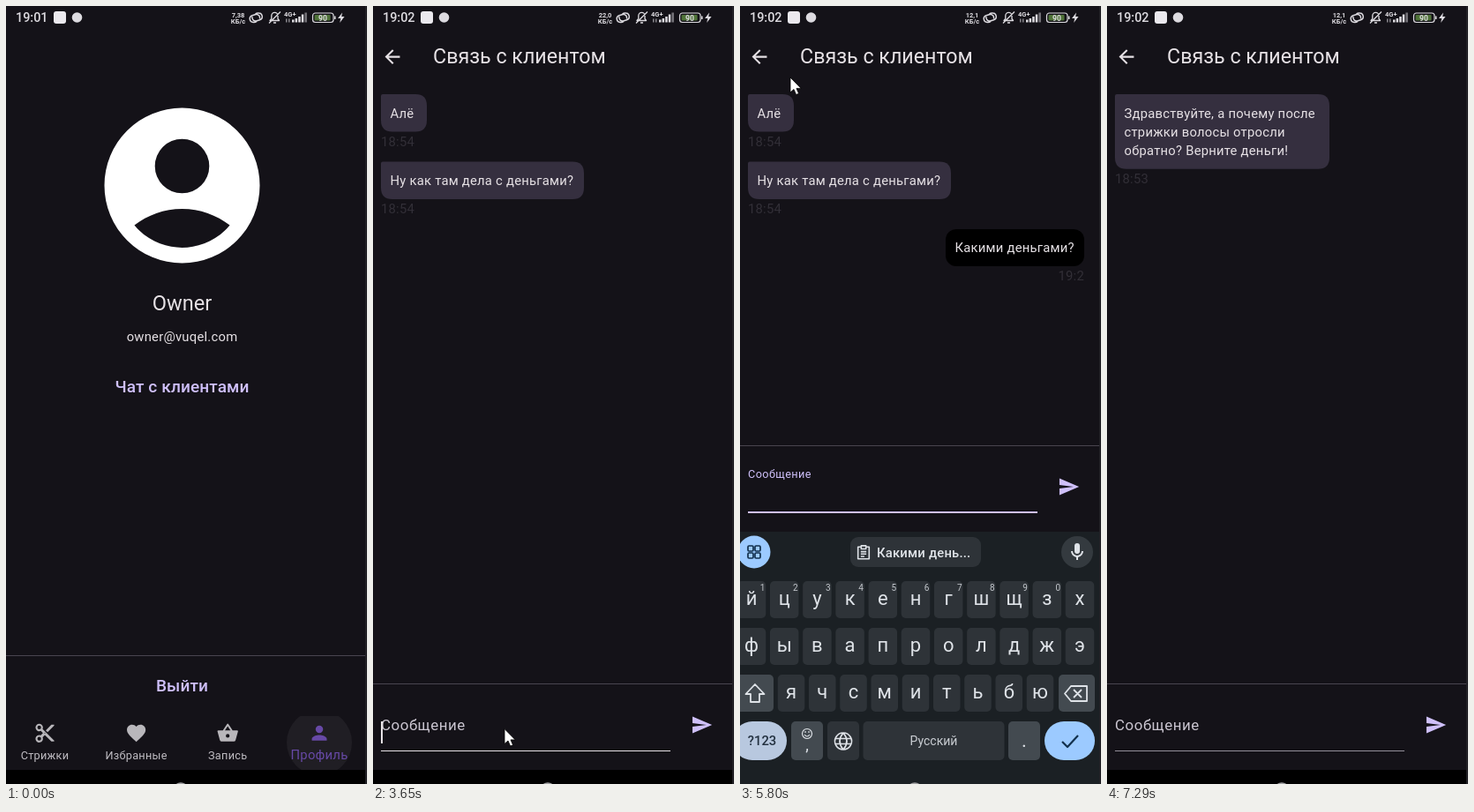
These frames come from a looping animation (409 by 882 pixels, 8000 ms). An HTML page:

```html
<!DOCTYPE html>
<html lang="ru">
<head>
<meta charset="utf-8">
<title>Чат с клиентами</title>
<style>
  html, body { margin: 0; width: 100%; height: 100%; overflow: hidden; background: #000; }
  svg { display: block; width: 100vw; height: 100vh; }
  text { font-family: Roboto, sans-serif; white-space: pre; }
</style>
</head>
<body>
<svg id="stage" viewBox="0 0 409 882" preserveAspectRatio="none"></svg>
<script>
const LOOP = 8000, DP = 1.057;
const BG = '#141218', TEXT = '#e6e1e5', PRIMARY = '#cfc0fa', LINE = '#49454f', OUTLINE = '#938f99', ACTIVE = '#6749a6',
      KEY = '#2e3338', KEY_ALT = '#434a50', BLUE = '#9ccaff', KEY_TEXT = '#dfe3e8';

const ICONS = {
  account: 'M12 2a10 10 0 1 0 0 20 10 10 0 1 0 0-20zm0 4a3.5 3.5 0 1 1 0 7 3.5 3.5 0 1 1 0-7zm0 14c-2.03 0-4.43-.82-6.14-2.88C7.55 15.8 9.68 15 12 15s4.45.8 6.14 2.12C16.43 19.19 14.03 20 12 20z',
  cut: 'M9.64 7.64A4 4 0 1 0 7.64 9.64L10 12l-2.36 2.36A4 4 0 1 0 9.64 16.36L12 14l7 7h3v-1zM6 8a2 2 0 1 1 0-4 2 2 0 1 1 0 4zm0 12a2 2 0 1 1 0-4 2 2 0 1 1 0 4zm6-7.5a.5.5 0 1 1 0-1 .5.5 0 1 1 0 1zM19 3l-6 6 2 2 7-7V3z',
  heart: 'M12 21.35l-1.45-1.32C5.4 15.36 2 12.28 2 8.5 2 5.42 4.42 3 7.5 3c1.74 0 3.41.81 4.5 2.09C13.09 3.81 14.76 3 16.5 3 19.58 3 22 5.42 22 8.5c0 3.78-3.4 6.86-8.55 11.54z',
  basket: 'M17.21 9l-4.38-6.56a1 1 0 0 0-1.66 0L6.79 9H2a1 1 0 0 0-.96 1.27l2.54 9.27A2 2 0 0 0 5.5 21h13a2 2 0 0 0 1.93-1.46l2.54-9.27A1 1 0 0 0 22 9zM9 9l3-4.4L15 9zm3 8a2 2 0 1 1 0-4 2 2 0 1 1 0 4z',
  person: 'M12 12a4 4 0 1 0 0-8 4 4 0 1 0 0 8zm0 2c-2.67 0-8 1.34-8 4v2h16v-2c0-2.66-5.33-4-8-4z',
  back: 'M20 11H7.83l5.59-5.59L12 4l-8 8 8 8 1.41-1.41L7.83 13H20z',
  send: 'M2 21L23 12 2 3v7l15 2-15 2z',
  palette: 'M12 2.5a9.5 9.5 0 1 0 0 19c1.6 0 2.2-1.5 1.3-2.6-1-1.2 0-2.4 1.2-2.4H17c2.6 0 4.5-2 4.5-4.6 0-5.3-4.3-9.4-9.5-9.4zM6.5 13a1.5 1.5 0 1 1 0-3 1.5 1.5 0 1 1 0 3zm3-4a1.5 1.5 0 1 1 0-3 1.5 1.5 0 1 1 0 3zm5 0a1.5 1.5 0 1 1 0-3 1.5 1.5 0 1 1 0 3zm3 4a1.5 1.5 0 1 1 0-3 1.5 1.5 0 1 1 0 3z',
  mic: 'M12 14a3 3 0 0 0 3-3V5a3 3 0 0 0-6 0v6a3 3 0 0 0 3 3zm5-3a5 5 0 0 1-10 0H5a7 7 0 0 0 6 6.9V21h2v-3.1A7 7 0 0 0 19 11z'
};

// Markup helpers
const text = (x, y, s, { size = 14 * DP, fill = TEXT, weight = 400, anchor = 'start', gap = .25, id = '' } = {}) =>
  `<text id="${id}" x="${x}" y="${y}" font-size="${size}" fill="${fill}" font-weight="${weight}" text-anchor="${anchor}" letter-spacing="${gap}">${s}</text>`;
const mid = (x, y, s, style) => text(x, y, s, { anchor: 'middle', ...style });
const rect = (x, y, w, h, fill, r = 0, extra = '') =>
  `<rect x="${x}" y="${y}" width="${w}" height="${h}" rx="${r}" fill="${fill}" ${extra}/>`;
const circle = (x, y, r, fill, extra = '') => `<circle cx="${x}" cy="${y}" r="${r}" fill="${fill}" ${extra}/>`;
const stroke = (d, color, width = 1.8) =>
  `<path d="${d}" fill="none" stroke="${color}" stroke-width="${width}" stroke-linejoin="round"/>`;
const icon = (name, x, y, fill, scale = DP) =>
  `<path d="${ICONS[name]}" fill="${fill}" fill-rule="evenodd" transform="translate(${x} ${y}) scale(${scale}) translate(-12 -12)"/>`;
const group = (id, body) => `<g id="${id}">${body}</g>`;
const page = (id, body) => group(id, rect(-8, 0, 415, 866, BG) + body);
const appBar = title => icon('back', 22, 57.6, TEXT) + text(68, 65, title, { size: 22 * DP, gap: 0 });

function profilePage() {
  const action = { size: 18 * DP, weight: 500, fill: PRIMARY, gap: .1 };
  const tabs = [['cut', 'Стрижки', 44], ['heart', 'Избранные', 147.6], ['basket', 'Запись', 251.2]];
  return page('profile',
    icon('account', 199.5, 203.5, '#fff', 8.8) +
    mid(199.5, 345, 'Owner', { size: 23.6, gap: 0 }) +
    mid(199.5, 380, 'owner@vuqel.com') +
    mid(199.5, 438, 'Чат с клиентами', action) +
    rect(-8, 736, 415, 1, LINE) +
    mid(199.5, 777, 'Выйти', action) +
    `<clipPath id="bar"><rect y="805" width="407" height="61"/></clipPath>` +
    circle(355, 835, 37, '#201e24', 'id="tabRipple" clip-path="url(#bar)"') +
    tabs.map(([name, label, x]) => icon(name, x, 824.3, '#b9b7bb') +
      mid(x, 854, label, { size: 12 * DP, fill: '#bfbcc2', gap: .3 })).join('') +
    icon('person', 355, 824.3, ACTIVE) + mid(355, 853.5, 'Профиль', { fill: ACTIVE }));
}

function listPage() {
  const card = (y, name, mail, message) => rect(-8, y, 415, 100, '#1d1b20') +
    icon('account', 25, y + 32.5, '#fff', 1.32) +
    text(51, y + 32, name, { weight: 500 }) +
    text(51, y + 53.5, mail, { weight: 500, fill: PRIMARY }) +
    text(51, y + 78, 'Сообщение: ' + message, { weight: 300 });
  return page('list', rect(-8, 92, 415, 212, '#111015') + rect(-8, 304, 415, 2, BG) + appBar('Список чатов') +
    card(92, 'Oleg', 'oleg@zuqil.com', 'Ну как там дела с ...') +
    card(201, 'Vitya', 'vitya@zuqil.com', 'Здравствуйте, а почему ...'));
}

function chatPage() {
  const bubble = (y, w, time, lines) => {
    const h = 42.5 + (lines.length - 1) * 21.1;
    return `<path d="M11 ${y}H${w - 4}q13 0 13 13V${y + h - 13}q0 13-13 13H22q-13 0-13-13V${y + 2}q0-2 2-2z" fill="#352f3f"/>` +
      lines.map((line, i) => text(19.5, y + 26.5 + i * 21.1, line)).join('') +
      text(9, y + h + 16, time, { fill: '#322f37' });
  };
  return page('chat', appBar('Связь с клиентом') +
    group('empty', mid(199.5, 428.5, 'Здесь пусто. Отправьте сообщение!')) +
    group('firstChat', bubble(100, 52, '18:54', ['Алё']) + bubble(176.5, 230, '18:54', ['Ну как там дела с деньгами?'])) +
    group('reply', rect(233, 253, 157, 42, '#000', 12) + text(243.5, 279, 'Какими деньгами?') +
      text(390, 311, '19:2', { anchor: 'end', fill: '#322f37' })) +
    group('secondChat', bubble(100, 243, '18:53',
      ['Здравствуйте, а почему после', 'стрижки волосы отросли', 'обратно? Верните деньги!'])) +
    group('input', rect(-8, 768, 415, 1, LINE) +
      rect(9, 844, 328, 1, OUTLINE, 0, 'id="underline"') +
      text(0, 0, 'Сообщение', { id: 'label', size: 16 * DP, gap: .53, fill: '#cac5d0' }) +
      text(9, 830.5, 'Какими деньгами?', { id: 'draft', size: 16 * DP, gap: .53 }) +
      rect(9, 811, 2, 25, TEXT, 0, 'id="caret"') + icon('send', 372.5, 815, PRIMARY)));
}

function clipboard(x, y, s) {
  return `<g transform="translate(${x} ${y}) scale(${s})">` +
    stroke('M-3-7H-7V8H7V-7H3M-3-8.5H3V-4.5H-3zM-3.5-1H3.5M-3.5 2H3.5M-3.5 5H1', KEY_TEXT) + '</g>';
}

function keyboard() {
  const letter = { size: 22, fill: KEY_TEXT, gap: 0 };
  const row = (chars, x, y, pitch, w) => [...chars].map((c, i) =>
    rect(x + i * pitch - w / 2, y, w, 42, KEY, 5) + mid(x + i * pitch, y + 27, c, letter)).join('');
  const digits = [...'1234567890'].map((d, i) => mid(25.5 + i * 37.2, 663, d, { size: 10, fill: '#c3c7cc', gap: 0 })).join('');
  const apps = [10, 18].flatMap(x => [613, 621].map(y => rect(x - 1, y - 1, 6, 6, 'none', 1.2, 'stroke="#12304d" stroke-width="1.7"'))).join('');
  return group('keyboard', rect(0, 596, 407, 286, '#1b2024') +
    circle(16, 619, 18.5, BLUE) + apps +
    group('tools', icon('palette', 107.5, 619, KEY_TEXT, .95) + clipboard(199, 619.5, 1) +
      mid(290, 624, 'GIF', { size: 14, weight: 700, fill: '#686d72', gap: .5 })) +
    group('chip', rect(125, 602, 148, 34, KEY, 9) + clipboard(140, 619.5, .9) +
      text(155, 624.5, 'Какими день...', { weight: 500, fill: KEY_TEXT, gap: .2 })) +
    circle(382, 619, 18, '#343a3f') + icon('mic', 382, 619, KEY_TEXT, 1) +
    row('йцукенгшщзх', 13, 652, 37.2, 32.5) + digits + row('фывапролджэ', 13, 705, 37.2, 32.5) +
    rect(-8, 758, 46, 42, KEY_ALT, 5) + stroke('M17 769L6.5 780H12V789H22V780H27.5z', KEY_TEXT) +
    row('ячсмитьбю', 58, 758, 35.25, 30.5) +
    rect(361, 758, 41, 42, KEY_ALT, 5) + stroke('M375 771H393V788H375L368 779.5zM378 775l9 9M387 775l-9 9', KEY_TEXT) +
    rect(-8, 811, 61, 44, '#b8c8df', 22) + mid(25, 838, '?123', { weight: 500, fill: '#22303f', gap: 0 }) +
    rect(58, 811, 36, 44, KEY_ALT, 5) + stroke('M76 819.5a5.5 5.5 0 1 0 .01 0zM73 826q3 4 6 0M74 822v2M78 822v2', KEY_TEXT, 1.2) +
    mid(76, 844, ',', { ...letter, size: 18 }) +
    rect(99, 811, 36, 44, KEY, 5) +
    stroke('M117 824a9.5 9.5 0 1 0 .01 0zM117 824q-8 9.5 0 19q8-9.5 0-19M108 830.5h18M108 836.5h18', KEY_TEXT, 1.6) +
    rect(139.5, 811, 160, 44, KEY, 5) + mid(219.5, 838, 'Русский', { size: 14, fill: '#c9cdd2', gap: 0 }) +
    rect(304, 811, 36, 44, KEY_ALT, 5) + mid(322, 840, '.', letter) +
    rect(345, 811, 57, 44, BLUE, 22) + stroke('M365 834l6 6 12-13', '#12304d', 2.2));
}

function statusBar() {
  const ink = '#dddbe0', tiny = { size: 7.5, weight: 700, fill: ink, gap: 0 };
  const bars = [3, 4.5, 6.5, 9, 11].map((h, i) => rect(324 + i * 3.6, 18.5 - h, 2.5, h, i < 4 ? ink : '#77757b')).join('');
  return text(11, 18, '', { id: 'clock', size: 14.4, weight: 500, fill: ink, gap: 0 }) +
    rect(54, 6, 14, 14, '#ebe9ee', 3) + circle(80.5, 13, 5.8, ink) +
    mid(263, 12.5, '', { ...tiny, id: 'speed' }) + mid(263, 20, 'КБ/с', tiny) +
    stroke('M284 17.5a4.5 4 0 0 1-4 1a4 4 0 0 1-1-7.8l4-1.2a4 4 0 0 1 4.5 5M282.5 9a4.5 4 0 0 1 4-1a4 4 0 0 1 1 7.8l-4 1.2a4 4 0 0 1-4.5-5', ink, 1.5) +
    stroke('M299 16.5h10.5l-1.5-2V11a3.6 3.6 0 0 0-7.2 0v3.5zM303 19h3M298 19.5l13-13', ink, 1.3) +
    text(315, 11.5, '4G+', tiny) + rect(317, 14.5, 1.5, 4, '#88868c') + rect(320, 14.5, 1.5, 4, '#88868c') + bars +
    rect(347.5, 8, 23.5, 10.5, 'none', 3, `stroke="${ink}" stroke-width="1.2"`) + rect(349.5, 10, 18, 6.5, '#4f7238', 1) +
    rect(372, 11.5, 1.5, 3.5, ink) + mid(359, 16.5, '90', { ...tiny, size: 8.5 }) +
    `<path d="M381 7.5l-5 6.5h3.2l-1 5 5.3-7h-3.3z" fill="${ink}"/>`;
}

document.getElementById('stage').innerHTML =
  rect(0, 0, 409, 882, '#000') + profilePage() + listPage() + chatPage() +
  group('tooltip', rect(3, 83.5, 67, 33, '#e7e6e8', 4) + text(20, 105.5, 'Back', { fill: '#17161a' })) +
  rect(0, 866, 407, 16, '#000') + keyboard() +
  circle(198, 889, 7.8, 'none', 'stroke="#a0a0a2" stroke-width="2"') +
  statusBar() + rect(407, 0, 2, 882, '#222126') +
  `<path id="cursor" d="M0 0V17l4-3.5 2.6 6 3-1.2L7 12.4h5.2z" fill="#fff" stroke="#000" stroke-width=".8"/>`;

// Motion
const $ = id => document.getElementById(id);
const ramp = (t, a, b) => Math.min(1, Math.max(0, (t - a) / (b - a)));
const lerp = (a, b, p) => a + (b - a) * p;
const smooth = p => p * p * (3 - 2 * p);
const zoomOut = p => 1 - (1 - p) ** 4;
const show = (id, on) => $(id).setAttribute('display', on ? 'inline' : 'none');
const set = (id, attrs) => Object.entries(attrs).forEach(([k, v]) => $(id).setAttribute(k, v));

const MOVES = [
  { at: -999, from: 'list', to: 'profile' },
  { at: 830, from: 'profile', to: 'list' },
  { at: 2270, from: 'list', to: 'chat' },
  { at: 5950, from: 'chat', to: 'list', pop: true },
  { at: 6970, from: 'list', to: 'chat' }
];

// Cursor runs of [time, x, y]; it is hidden between runs
const RUNS = [
  [[160, 385, 870], [490, 222, 425], [1580, 222, 425], [2060, 204, 167.5], [3080, 204, 167.5],
   [3610, 149, 819.5], [3690, 149, 819.5], [3880, 149, 884]],
  [[4750, 149, 800], [5080, 374, 545], [5580, 374, 545], [5800, 57, 81], [5890, 21, 56],
   [6410, 21, 56], [6640, 177, 276], [6780, 180, 282], [7270, 180, 282]]
];

function drawPages(t) {
  const move = MOVES.findLast(m => m.at <= t);
  const p = ramp(t, move.at, move.at + (move.pop ? 300 : 225));
  const e = zoomOut(move.pop ? p : lerp(.255, 1, p));
  const place = (id, scale, opacity) => set(id, {
    transform: `translate(199.5 433) scale(${scale}) translate(-199.5 -433)`, opacity
  });
  for (const id of ['profile', 'list', 'chat']) show(id, id === move.to || (id === move.from && p < 1));
  if (move.pop) {
    place(move.from, lerp(1, .9, e), 1 - ramp(p, .1, .5));
    place(move.to, lerp(1.1, 1, e), 1);
  } else {
    place(move.from, lerp(1, 1.05, e), lerp(1, .6, e));
    place(move.to, lerp(.85, 1, e), 1);
  }
}

function drawChat(t) {
  const second = t >= 6970, loaded = second ? t >= 7240 : t >= 2720;
  show('empty', !loaded);
  show('firstChat', loaded && !second);
  show('reply', t >= 5400 && !second);
  show('secondChat', loaded && second);

  const open = smooth(ramp(t, 3920, 4200)) - smooth(ramp(t, 5950, 6200));
  const focus = second ? 0 : smooth(ramp(t, 3690, 3850));
  const hover = t >= 3560 && !second;
  set('keyboard', { transform: `translate(0 ${286 * (1 - open)})` });
  show('keyboard', open > 0);
  set('input', { transform: `translate(0 ${-270 * open})` });
  set('label', {
    transform: `translate(9 ${lerp(820.5, 804.5, focus)}) scale(${lerp(1, .75, focus)})`,
    fill: focus > .5 ? PRIMARY : '#cac5d0'
  });
  set('underline', { height: focus ? 2 : 1, y: focus ? 843 : 844, fill: focus ? PRIMARY : hover ? TEXT : OUTLINE });

  const drafted = t >= 4520 && t < 5150;
  show('draft', drafted);
  show('tools', t < 4560);
  show('chip', t >= 4560);
  const blinkFrom = [3640, 4520, 5150].findLast(start => start <= t);
  show('caret', t < 5950 && (t - blinkFrom) % 1000 < 500);
  set('caret', { x: drafted ? 9 + $('draft').getComputedTextLength() : 9 });
}

function drawCursor(t) {
  const run = RUNS.find(r => t >= r[0][0] && t < r.at(-1)[0]);
  show('cursor', run);
  if (!run) return;
  const i = run.findIndex(k => k[0] > t);
  const [t0, x0, y0] = run[i - 1], [t1, x1, y1] = run[i];
  const p = smooth(ramp(t, t0, t1));
  set('cursor', { transform: `translate(${lerp(x0, x1, p)} ${lerp(y0, y1, p)})` });
}

function draw() {
  const t = performance.now() % LOOP;
  drawPages(t);
  drawChat(t);
  drawCursor(t);
  set('tabRipple', { opacity: 1 - ramp(t, 160, 320) });
  set('tooltip', { opacity: ramp(t, 6220, 6340) - ramp(t, 6680, 6760) });
  $('clock').textContent = t < 3300 ? '19:01' : '19:02';
  $('speed').textContent = t < 3300 ? '7,38' : t < 5600 ? '22,0' : '12,1';
  requestAnimationFrame(draw);
}
draw();
</script>
</body>
</html>
```
